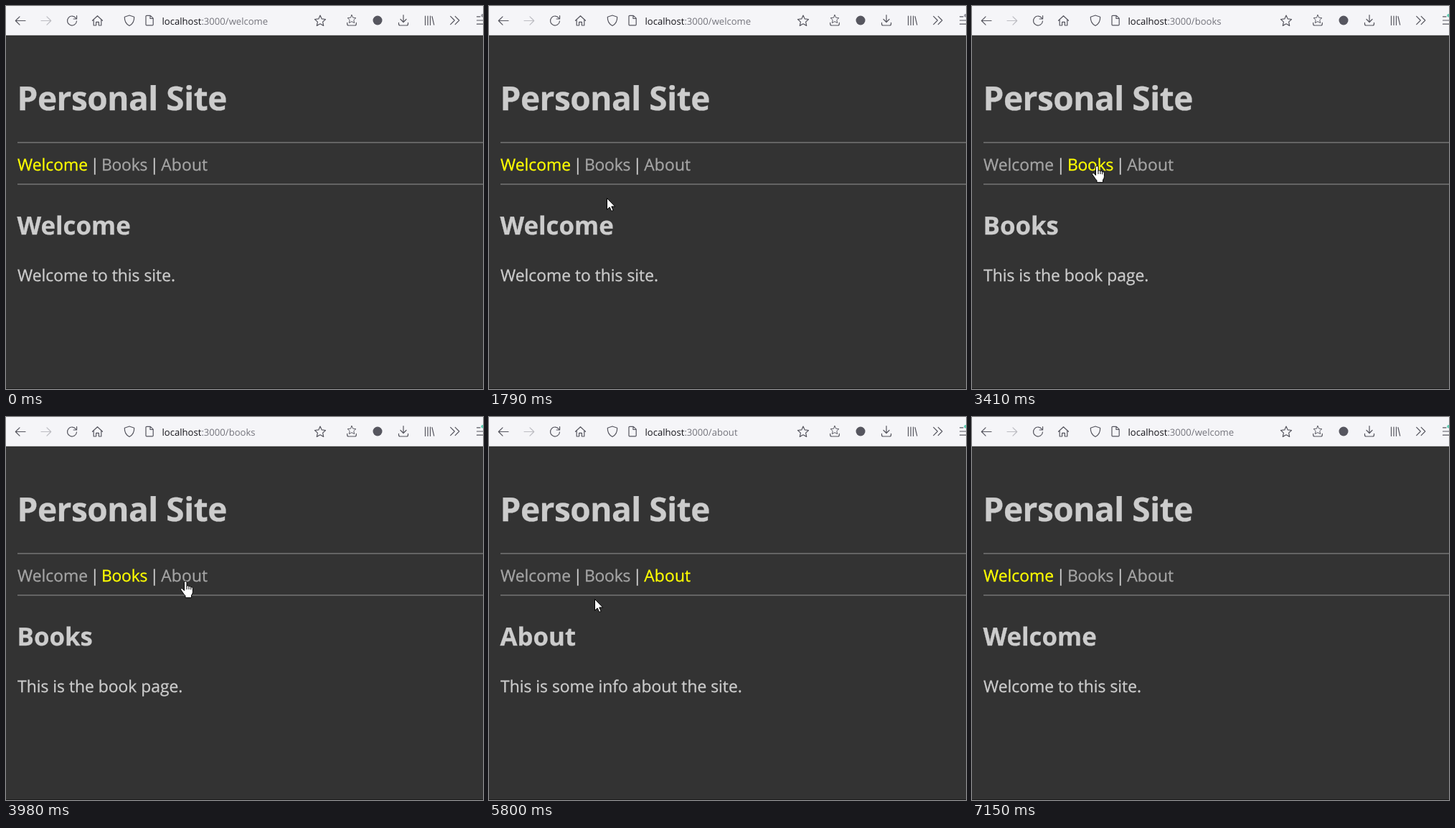
Animation, 665 px wide and 533 px high, one loop 8.27 s. Source, as an HTML page:

```html
<!DOCTYPE html>
<html lang="en">
<head>
<meta charset="utf-8">
<title>Personal Site</title>
<style>
  html, body { margin: 0; width: 100%; height: 100%; overflow: hidden; background: #333; }
  svg { display: block; }
  text {
    font-family: "Open Sans", "Noto Sans", sans-serif;
    font-size: 22.85px;
    color: #ccc;
    fill: currentColor;
    stroke: currentColor;
    stroke-width: .3px;
    text-rendering: geometricPrecision;
  }
  .title { font-size: 46px; font-weight: 700; letter-spacing: -.5px; }
  .heading { font-size: 34.8px; font-weight: 700; }
  .link { color: #a5a5a5; }
  .link.active { color: #ff0; }
  .bar { text-anchor: middle; }
  .url { font-size: 13.1px; color: #74747c; stroke: none; }
  .host { fill: #15141a; }
  .icons { fill: none; stroke: #56565f; stroke-width: 1.2; stroke-linecap: round; stroke-linejoin: round; }
  .off { stroke: #bcbcc2; }
  .pointer { fill: #fff; stroke: #000; stroke-width: 1; stroke-linejoin: round; }
</style>
</head>
<body>
<svg width="665" height="533" viewBox="0 0 665 533">
  <defs>
    <path id="star" d="M0-7.6 2.2-2.7 7.5-2.1 3.6 1.5 4.7 6.8 0 4.2-4.7 6.8-3.6 1.5-7.5-2.1-2.2-2.7Z"/>
    <path id="back" d="M7 0H-6.5M-1-5.7-6.7 0-1 5.7"/>
  </defs>

  <rect width="665" height="533" fill="#333"/>
  <rect y="532" width="665" height="1" fill="#1b1b1b"/>

  <!-- browser toolbar -->
  <rect width="665" height="41" fill="#f5f5f8"/>
  <rect y="40" width="665" height="1" fill="#ccc"/>
  <g class="icons">
    <use href="#back" x="20" y="20.5"/>
    <use href="#back" class="off" transform="translate(56 20.5) scale(-1 1)"/>
    <path d="M97.6 17.2A6.5 6.5 0 1 0 98.5 21M98.6 13.6V18H94.2"/>
    <path d="M120.5 20.3 127.5 13.7 134.5 20.3M122.2 19V27H125.6V22.3H129.4V27H132.8V19"/>
    <path d="M172 13 178.7 15.3C178.9 21 177 25 172 27.5C167 25 165.1 21 165.3 15.3Z"/>
    <path d="M195 14.3Q195 13.3 196 13.3H201.3L205.2 17.2V25.8Q205.2 26.8 204.2 26.8H196Q195 26.8 195 25.8ZM201 13.5V17.5H205"/>
    <use href="#star" x="438" y="20.6"/>
    <use href="#star" transform="translate(482 18.3) scale(.78)"/>
    <path d="M475.7 23.3V25Q475.7 27 477.7 27H486.3Q488.3 27 488.3 25V23.3"/>
    <circle cx="518" cy="20" r="6.5" fill="#56565f" stroke="none"/>
    <path d="M554 12.7V22.3M550 18.5 554 22.5 558 18.5M547.5 23.3V25Q547.5 27 549.5 27H558.5Q560.5 27 560.5 25V23.3"/>
    <path d="M584.5 14V26.5M588 14V26.5M591.5 14V26.5M594 14.7 596.7 26.2"/>
    <path d="M619.7 14.4 625.3 20 619.7 25.6M626.2 14.4 631.8 20 626.2 25.6"/>
    <path d="M656.5 14.8H661M656.5 20H667M656.5 25.2H667"/>
  </g>
  <circle id="badge" cx="664.5" cy="13.3" r="2.3"/>
  <text class="url" x="217.5" y="25.5"><tspan class="host">localhost</tspan>:3000/<tspan id="path"></tspan></text>

  <!-- page -->
  <text class="title" x="15.5" y="145">Personal Site</text>
  <g fill="#858585">
    <rect x="16" y="189.4" width="649" height="1.2"/>
    <rect x="16" y="247.4" width="649" height="1.2"/>
  </g>
  <text class="link" x="16" y="229">Welcome</text>
  <text class="bar" x="123.8" y="229">|</text>
  <text class="link" x="133" y="229" letter-spacing="-.25">Books</text>
  <text class="bar" x="206.7" y="229">|</text>
  <text class="link" x="216.2" y="229" letter-spacing=".15">About</text>
  <text class="heading" id="heading" x="15.5" y="318"></text>
  <text id="body" x="16" y="383"></text>

  <path id="arrow" class="pointer" d="M.5.5V16.3L4.2 12.9 6.7 18.5 9.2 17.4 6.8 12H11.7Z"/>
  <g id="hand" class="pointer">
    <path d="M5.5 13.6V2.4Q5.6.5 7.2.5T9 2.4V7.6Q9.3 6.6 10.5 6.7T12 8.3Q12.3 7.4 13.4 7.5T14.8 9.2Q15.2 8.4 16.2 8.7T17.4 10.4V15.5Q17.4 18 15.6 20V23.4H7V20.8Q4.5 18.4 3.2 15.8L.9 12.8Q.2 11.4 1.3 10.8T3.6 11.4Z"/>
    <path d="M9 7.6V12M12 8.3V12M14.8 9.2V12.3" fill="none"/>
  </g>
</svg>

<script>
const LOOP = 8270;
const pages = [
  ["Welcome", "Welcome to this site."],
  ["Books", "This is the book page."],
  ["About", "This is some info about the site."]
];

// [time, page index]
const views = [[0, 0], [2580, 1], [4550, 2], [6480, 0]];
const urls = [[0, 0], [2700, 1], [4550, 2], [6630, 0]];

// [time, pointer, left, top]
const moves = [
  [0, ""],
  [1280, "arrow", 221, 491], [1400, "arrow", 181, 401],
  [1550, "arrow", 172, 350], [1670, "arrow", 163, 302],
  [1790, "arrow", 164, 267], [1910, "arrow", 164, 247],
  [2050, "hand", 158, 225], [2180, "hand", 155, 222],
  [3410, "hand", 167, 222], [3530, "hand", 192, 226],
  [3680, "hand", 214, 226], [3830, "hand", 238, 227],
  [3980, "hand", 243, 228], [5260, "hand", 244, 231],
  [5380, "arrow", 250, 237], [5530, "arrow", 228, 246],
  [5650, "arrow", 201, 253], [5800, "arrow", 147, 253],
  [5920, "arrow", 114, 246], [6040, "hand", 90, 233],
  [6190, "hand", 83, 226], [7030, "arrow", 102, 253],
  [7150, ""]
];

const el = id => document.getElementById(id);
const links = document.querySelectorAll(".link");
const at = (steps, t) => steps.findLast(step => step[0] <= t);

function draw(t) {
  const page = at(views, t)[1];
  const [name, body] = pages[page];
  el("heading").textContent = name;
  el("body").textContent = body;
  links.forEach((link, i) => link.classList.toggle("active", i === page));
  el("path").textContent = pages[at(urls, t)[1]][0].toLowerCase();
  el("badge").setAttribute("fill", t < 2580 ? "#9a9aa2" : "#5fd0b5");

  const [, pointer, x, y] = at(moves, t);
  for (const id of ["arrow", "hand"]) {
    const shown = id === pointer;
    el(id).style.display = shown ? "" : "none";
    if (shown) el(id).setAttribute("transform", `translate(${x} ${y})`);
  }
}

const start = performance.now();
function tick() {
  draw((performance.now() - start) % LOOP);
  requestAnimationFrame(tick);
}
tick();
</script>
</body>
</html>
```
